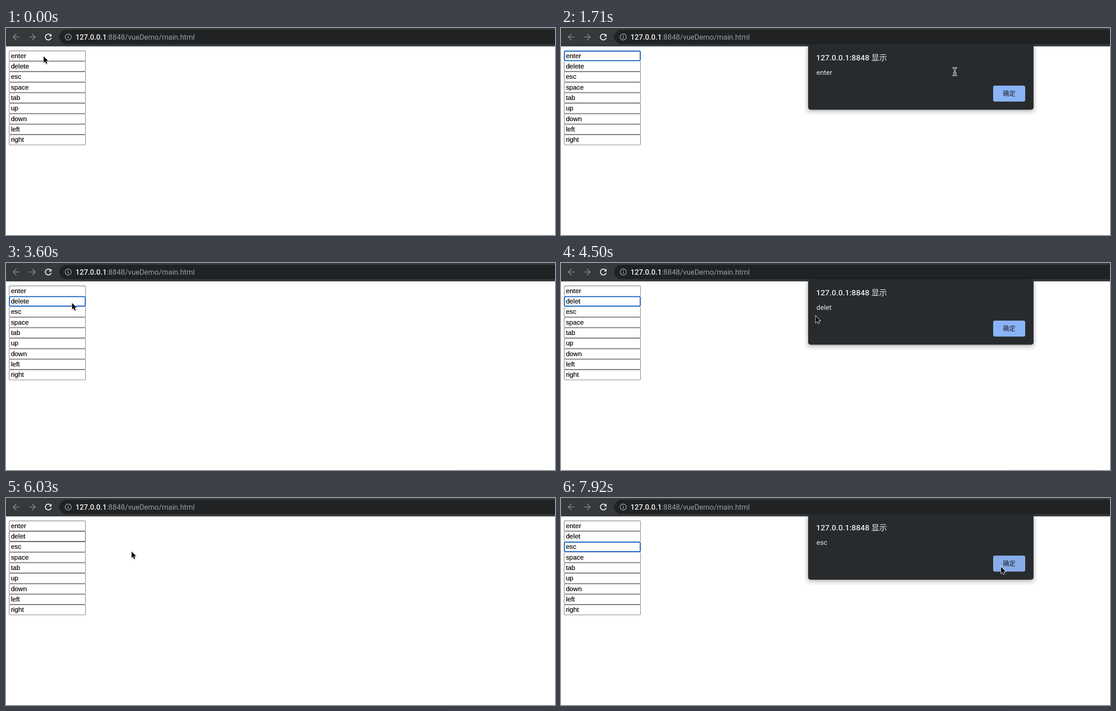
An HTML page that plays this animation: 1217 by 460 pixels, repeating every 8 s.

```html
<!DOCTYPE html>
<html lang="zh-CN">
<head>
<meta charset="utf-8">
<title>Key events</title>
<style>
  html, body { margin: 0; width: 100%; height: 100%; overflow: hidden; background: #fff; }
  #stage { position: relative; width: 1217px; height: 460px; overflow: hidden; background: #fff; }
  #stage > * { position: absolute; left: 0; top: 0; }
  svg { display: block; overflow: visible; }
  svg text { font-family: Roboto, "Noto Sans CJK SC", "Noto Sans CJK", sans-serif; white-space: pre; }

  .field { fill: none; stroke: #767676; stroke-width: 1.11; }
  .field.dark { stroke: #3c3c3c; }
  #page text { font: 14.81px "Liberation Sans", Arial, sans-serif; stroke: #000; stroke-width: .2; }

  #stage > #dialog {
    left: 548px; top: 37px; width: 499px; height: 144px;
    border-radius: 5px; transform-origin: 50% 100%;
    box-shadow: 0 0 0 .6px rgba(0,0,0,.25), 0 3px 8px rgba(0,0,0,.3), 0 4px 0 8px rgba(0,0,0,.035);
  }
  #arrow { filter: drop-shadow(0 1px 1px rgba(0,0,0,.3)); }
</style>
</head>
<body>
<div id="stage">
  <svg id="page" width="1217" height="460">
    <rect width="1217" height="41" fill="#35393c"/>
    <rect x="118" y="4" width="1140" height="32" rx="16" fill="#202224"/>
    <rect y="40" width="1217" height="1" fill="#55585b"/>
    <rect x="985" y="459" width="215" height="1" fill="#f0f0f0"/>
    <g fill="none" stroke="#85898c" stroke-width="1.7">
      <path d="M30 20H16.5M23 13.2L16.2 20L23 26.8"/>
      <path d="M51 20H64.5M58 13.2L64.8 20L58 26.8"/>
      <path d="M98.6 15.4A6.6 6.6 0 1 0 100.2 21.8" stroke="#f1f3f4" stroke-width="2"/>
      <path d="M101 12.8V18.8H95Z" fill="#f1f3f4" stroke="none"/>
      <circle cx="138" cy="20" r="6.8" stroke="#9aa0a6" stroke-width="1.5"/>
      <path d="M138 19V23.6M138 16V17.7" stroke="#9aa0a6"/>
    </g>
    <g id="fields"></g>
    <g id="focus" fill="none">
      <rect x="6" y="-.5" width="171.2" height="24.3" rx="3" stroke="#fff" stroke-width="1.6"/>
      <rect x="7.6" y="1.1" width="168.1" height="21.1" rx="2" stroke="#105ebe" stroke-width="2.2"/>
    </g>
    <g id="labels"></g>
    <rect id="caret" width="1.1" height="16.7"/>
  </svg>
  <div id="dialog">
    <svg width="500" height="145">
      <rect width="499.5" height="144.5" rx="5" fill="#282b2d"/>
      <text x="17.6" y="35" font-size="17.4" font-weight="500" fill="#e8eaed">127.0.0.1:8848 显示</text>
      <text id="message" x="18.3" y="67.4" font-size="15.3" fill="#e8eaed"></text>
      <rect id="button" x="410" y="91" width="71" height="35.5" rx="4"/>
      <text x="445.5" y="113.2" font-size="14" font-weight="500" text-anchor="middle" fill="#202124">确定</text>
    </svg>
  </div>
  <svg id="pointer" width="24" height="24">
    <path id="arrow" d="M1.5 2V16.2L4.7 13.2L7 18.5L9.3 17.5L7 12.3H11.6Z" stroke="#fff" stroke-width="1.8" paint-order="stroke"/>
    <g id="beam" fill="none" stroke-linecap="round">
      <g stroke="#fff" stroke-width="3.2"><use href="#ibeam"/></g>
      <g stroke="#111" stroke-width="1.2"><use href="#ibeam"/></g>
    </g>
    <defs>
      <path id="ibeam" d="M-3.5 -8.3Q0 -8.3 0 -5.5Q0 -8.3 3.5 -8.3M0 -5.5V5.5M-3.5 8.3Q0 8.3 0 5.5Q0 8.3 3.5 8.3M-2 2.5H2"/>
    </defs>
  </svg>
</div>
<script>
const LOOP = 8000, TICK = 90, BLINK = 450, CLOSING = 180;
const TOP = 50.3, PITCH = 23.33;
const $ = id => document.getElementById(id);
const show = (el, on) => { el.style.display = on ? '' : 'none'; };

function svg(parent, tag, attrs, text = '') {
  const el = document.createElementNS('http://www.w3.org/2000/svg', tag);
  for (const name in attrs) el.setAttribute(name, attrs[name]);
  el.textContent = text;
  return parent.appendChild(el);
}

// Each round: focus a field, press a key (hides the pointer), dismiss the alert.
const rounds = [
  { focus: 270, key: 1080, open: 1260, stir: 1530, close: 2205, text: 'enter' },
  { focus: 3150, key: 4140, open: 4230, stir: 4410, close: 5400, text: 'delet' },
  { focus: 6300, key: 7020, open: 7200, stir: 7470, close: 9000, text: 'esc' }
];

// Pointer moves: start time, end time, destination x and y.
const home = { x: 82, y: 61 };
const moves = [
  [0, 180, 81, 36], [180, 270, 79, 62], [450, 540, 121, 62],
  [1440, 1710, 873, 97], [1710, 2160, 990, 154], [2403, 3240, 145, 87],
  [4320, 4950, 998, 146], [5490, 6390, 140, 112], [7380, 7920, 974, 151]
];

const url = svg($('page'), 'text', { x: 154, y: 25.8, fill: '#9aa0a6',
  style: 'font: 16.3px Roboto, sans-serif; stroke: none' });
svg(url, 'tspan', { fill: '#f1f3f4', 'font-weight': 500 }, '127.0.0.1');
url.append(':8848/vueDemo/main.html');

const names = ['enter', 'delete', 'esc', 'space', 'tab', 'up', 'down', 'left', 'right'];
const fields = names.map((_, i) => svg($('fields'), 'rect',
  { class: 'field', x: 7.05, y: TOP + i * PITCH + .55, width: 169.2, height: PITCH - 1.11, rx: 1.8 }));
const labels = names.map((name, i) => svg($('labels'), 'text',
  { x: 10.9, y: TOP + i * PITCH + 16.4 }, name));

function pointerAt(t) {
  let { x, y } = home;
  for (const [t0, t1, toX, toY] of moves) {
    const u = Math.min(1, Math.max(0, (t - t0) / (t1 - t0)));
    const ease = 1 - (1 - u) ** 2;
    x += (toX - x) * ease;
    y += (toY - y) * ease;
  }
  return { x, y };
}

const inside = (p, x0, y0, x1, y1) => p.x >= x0 && p.x <= x1 && p.y >= y0 && p.y <= y1;

function drawFields(t) {
  const now = rounds.filter(r => t >= r.focus).length - 1;
  const r = rounds[now];
  const focused = r && t < r.close;
  fields.forEach((el, i) => el.classList.toggle('dark', i === now && !focused));
  labels[1].textContent = t < rounds[1].key ? 'delete' : 'delet';
  show($('focus'), focused);
  show($('caret'), focused && t < r.focus + BLINK);
  if (!focused) return;
  const y = TOP + now * PITCH;
  $('focus').setAttribute('transform', `translate(0 ${y})`);
  $('caret').setAttribute('x', 10.9 + labels[now].getComputedTextLength());
  $('caret').setAttribute('y', y + 3.3);
}

function drawDialog(t, pointer) {
  const r = rounds.find(d => t >= d.open && t < d.close + CLOSING);
  show($('dialog'), r);
  if (!r) return false;
  const p = Math.max(0, t - r.close) / 90;
  $('message').textContent = r.text;
  $('dialog').style.opacity = t < r.open + TICK ? .7 : 1 - .3 * p * p;
  $('dialog').style.transform = p
    ? `translateY(${-7 * p ** 1.5}px) perspective(500px) rotateX(${4.5 * p}deg) scaleY(${1 + .023 * p})`
    : 'none';
  $('button').setAttribute('fill', inside(pointer, 958, 128, 1029, 163) ? '#87ade9' : '#8ab4f8');
  return true;
}

function draw(t) {
  const pointer = pointerAt(t);
  drawFields(t);
  const open = drawDialog(t, pointer);
  const beam = open && inside(pointer, 566, 87, 1030, 110);
  show($('pointer'), !rounds.some(r => t >= r.key && t < r.stir));
  show($('arrow'), !beam);
  show($('beam'), beam);
  $('pointer').style.transform = `translate(${Math.round(pointer.x)}px, ${Math.round(pointer.y)}px)`;
}

const start = performance.now();
function loop() {
  const t = (performance.now() - start) % LOOP;
  draw(Math.floor(t / TICK) * TICK);
  requestAnimationFrame(loop);
}
loop();
</script>
</body>
</html>
```
